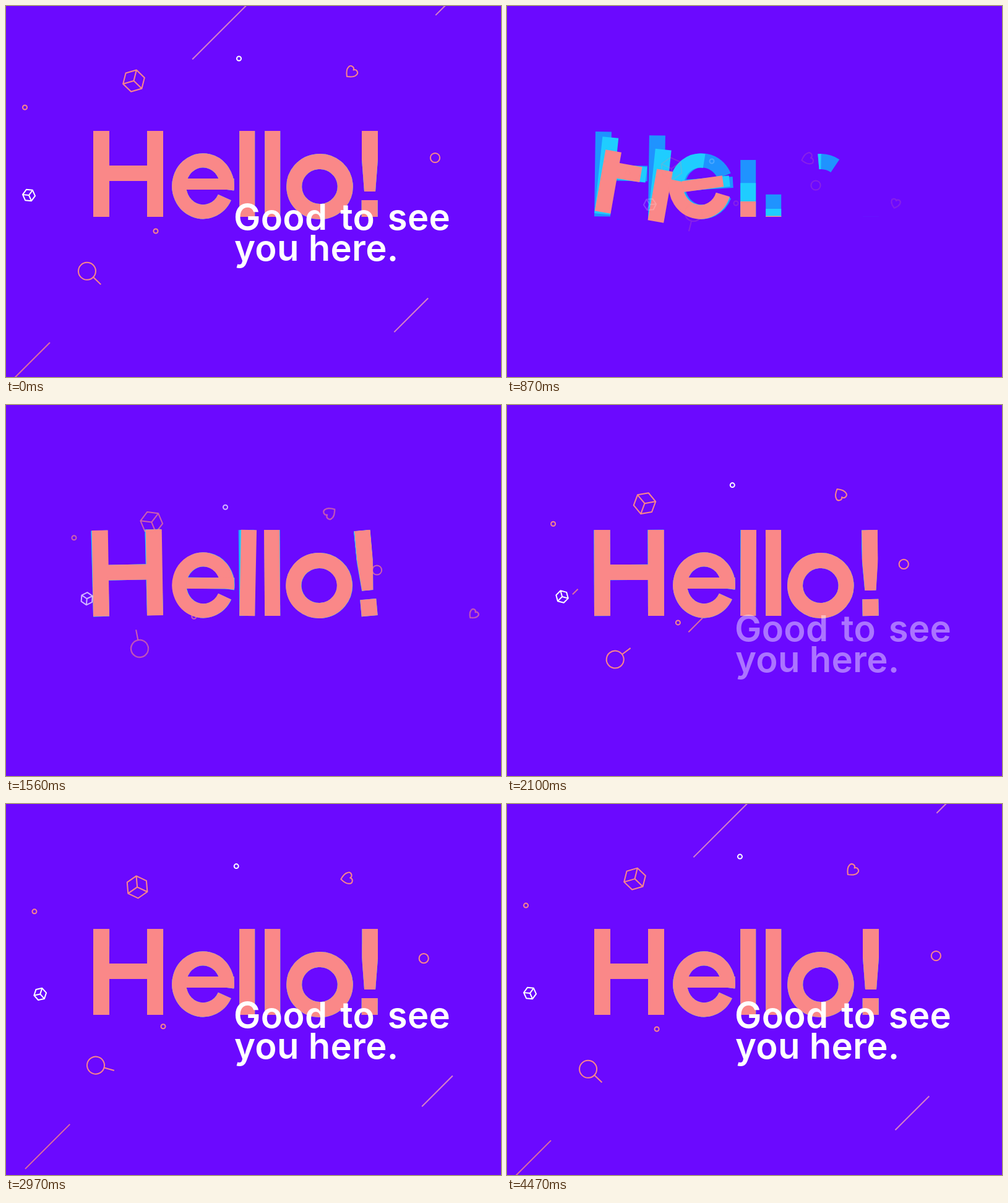
Animation, 800 px wide and 600 px high, one loop 4500 ms. Source, as an HTML page:

```html
<!DOCTYPE html>
<html lang="en">
<head>
<meta charset="utf-8">
<title>Hello!</title>
<style>
  html, body { margin: 0; width: 100%; height: 100%; overflow: hidden; background: #6b09ff; }
  svg { display: block; width: 100vw; height: 100vh; }
  path { fill: none; vector-effect: non-scaling-stroke; }
  #lines, #icons { stroke-width: 2; stroke-linejoin: round; }
  #greet { font: 600 58px/1 Inter, "Open Sans", sans-serif; letter-spacing: .3px; fill: #fff; }
  #greet .wide { word-spacing: .1em; }
  .pink { stroke: #fa8888; }
  .pale { stroke: #f3a0b8; }
  .white { stroke: #fff; }
</style>
</head>
<body>
<svg viewBox="0 0 800 600" xmlns="http://www.w3.org/2000/svg">
  <defs>
    <clipPath id="taper"><path d="M575 202H601V248L597 300H579L575 248Z"/></clipPath>
  </defs>
  <g id="scene">
    <g id="lines" opacity=".8"></g>
    <g id="word"></g>
    <g id="icons"></g>
    <g id="greet"><text class="wide" x="368" y="362">Good to see</text><text x="369" y="412">you here.</text></g>
  </g>
</svg>
<script>
const LOOP = 4500, OUTRO = 540;
const GROW = 277, LAG = 40;          // stroke draw time, delay between colour layers
const UPRIGHT = 260, SWING = 560;    // first upright moment and period of the wobble
const $ = id => document.getElementById(id);

function add(parent, tag, attrs) {
  const el = document.createElementNS('http://www.w3.org/2000/svg', tag);
  for (const k in attrs) el.setAttribute(k, attrs[k]);
  return parent.appendChild(el);
}
const clamp = v => Math.min(1, Math.max(0, v));
const easeInOut = x => x < .5 ? 2 * x * x : 1 - 2 * (1 - x) ** 2;

// Clockwise elliptical arc between two angles in degrees, drawn as two halves
function arc(cx, cy, rx, ry, from, to) {
  const point = deg => {
    const a = deg * Math.PI / 180;
    return `${cx + rx * Math.cos(a)} ${cy + ry * Math.sin(a)}`;
  };
  const half = deg => `A${rx} ${ry} 0 0 1 ${point(deg)}`;
  return `M${point(from)}${half((from + to) / 2)}${half(to)}`;
}
const ring = r => arc(0, 0, r, r, 0, 360);

// Letters
const stem = x => `M${x} 341V202`;
const letters = [
  { x: 197.5, start: 616, swing: 12.2, early: true, strokes: [
    { d: stem(154), w: 26 },
    { d: stem(241), w: 26, delay: 20 },
    { d: 'M166 270.5H229', w: 25, delay: 20 }] },
  { x: 318, start: 650, swing: -8, early: true, strokes: [
    { d: arc(318.5, 291.3, 38.8, 41.5, 26, 368), w: 23 },
    { d: 'M291 288H368.5', w: 18, delay: -60 }] },
  { x: 389.7, start: 707, swing: 11, strokes: [{ d: stem(389.7), w: 25 }] },
  { x: 430.7, start: 770, swing: -2, strokes: [{ d: stem(430.7), w: 25 }] },
  { x: 507, start: 805, swing: -4, strokes: [
    { d: arc(507, 292, 41.3, 40.5, -95, 265), w: 25 }] },
  { x: 588, start: 860, swing: -19, strokes: [
    { d: 'M587.7 341V314', w: 26 },
    { d: 'M588 300V202', w: 26, delay: 30, clip: 'url(#taper)' }] }
];
const glyphs = ['#1f93ff', '#1fcdff', '#fa8888'].flatMap((stroke, layer) =>
  letters.map(l => {
    const g = add($('word'), 'g', { stroke });
    const parts = l.strokes.map(({ d, w, delay = 0, clip = 'none' }) => ({
      delay,
      el: add(g, 'path', { d, 'stroke-width': w, pathLength: 1, 'stroke-dasharray': '1 2', 'clip-path': clip })
    }));
    return { ...l, g, parts, start: l.start + layer * LAG };
  }));

function lean(age, swing, early) {
  const s = age - UPRIGHT;
  if (s < 0 && !early) return 0;
  return -swing * Math.sin(2 * Math.PI * s / SWING) * Math.exp(-.003 * Math.max(0, s));
}

function drawWord(t) {
  for (const { g, parts, x, swing, early, start } of glyphs) {
    const age = t - start;
    g.setAttribute('transform', `rotate(${lean(age, swing, early)} ${x} 341)`);
    for (const { el, delay } of parts) {
      const p = easeInOut(clamp((age - delay) / GROW));
      el.style.visibility = p > 0 ? 'visible' : 'hidden';
      el.setAttribute('stroke-dashoffset', 1 - p);
    }
  }
}

// Icons drift outwards and slow down
const cube = 'M18 0L9 15.6H-9L-18 0L-9 -15.6H9ZM0 0H18M0 0L-9 15.6M0 0L-9 -15.6';
const heart = 'M0 10C-4 7 -9 3 -9 -2.5A4.7 4.7 0 0 1 0 -5A4.7 4.7 0 0 1 9 -2.5C9 3 4 7 0 10Z';
const lens = arc(-6, 0, 14, 14, 0, 360) + 'M8 0H25';

function icon(d, color, from, to, { angle = 0, spin = 0, size = 1 } = {}) {
  const el = add($('icons'), 'path', { d, class: color });
  return left => {
    const [x, y] = to.map((v, i) => v + (from[i] - v) * left);
    el.setAttribute('transform', `translate(${x} ${y}) rotate(${angle + spin * left}) scale(${size})`);
  };
}
const icons = [
  icon(ring(3.5), 'pink', [195, 269], [30.5, 164]),
  icon(ring(3.5), 'white', [331, 251], [376.5, 85]),
  icon(ring(3.5), 'pink', [370, 319], [242, 364]),
  icon(ring(7.6), 'pink', [499, 290], [693.5, 245.5]),
  icon(cube, 'pink', [266, 263], [206.5, 121], { angle: 44, spin: -200 }),
  icon(cube, 'white', [231, 321], [37, 306], { angle: 66, spin: -190, size: .56 }),
  icon(heart, 'pink', [486, 247], [558, 107], { angle: 45, spin: 390 }),
  icon(heart, 'pink', [628, 319], [875, 356], { angle: 71, spin: -56, size: .8 }),
  icon(lens, 'pink', [300, 340], [135.3, 433], { angle: 44, spin: -300 })
];

function drawIcons(t) {
  const s = Math.max(t, 600) - 870;
  const left = Math.exp(-.00105 * s) * (1 - Math.max(0, s / (LOOP - 870)) ** 3.5);
  $('icons').setAttribute('opacity', clamp((t - 594) / 1380));
  icons.forEach(move => move(left));
}

// Diagonal streaks glide down to the left while they lengthen
function streak(color, x, y, travel, length) {
  const el = add($('lines'), 'path', { class: color });
  return k => {
    const l = length * (1 - k / 3);
    el.setAttribute('d', l > 0 ? `M${x + travel * k} ${y - .85 * travel * k}l${l} ${-l}` : '');
  };
}
const streaks = [
  streak('pink', -10, 625, 142, 80),
  streak('pink', -176, 546, 132, 30),
  streak('pale', 626, 528.5, 160, 55),
  streak('pale', 298, 89, 371, 130),
  streak('pale', 693, 16, 151, 45)
];

function drawStreaks(t) {
  const k = Math.exp(-.0023 * (t - 2430));
  streaks.forEach(move => move(k));
}

function drawGreeting(t) {
  const s = Math.max(0, t - 2000);
  $('greet').setAttribute('opacity', clamp(s / 230));
  $('greet').setAttribute('transform', `translate(0 ${55 * Math.exp(-.0102 * s)})`);
}

function render(t) {
  const leaving = t < OUTRO;
  $('scene').setAttribute('opacity', leaving ? 1 - t / OUTRO : 1);
  const at = leaving ? LOOP : t;
  for (const draw of [drawWord, drawIcons, drawStreaks, drawGreeting]) draw(at);
}

let origin;
function tick(now) {
  origin ??= now;
  render((now - origin) % LOOP);
  requestAnimationFrame(tick);
}
render(0);
requestAnimationFrame(tick);
</script>
</body>
</html>
```
